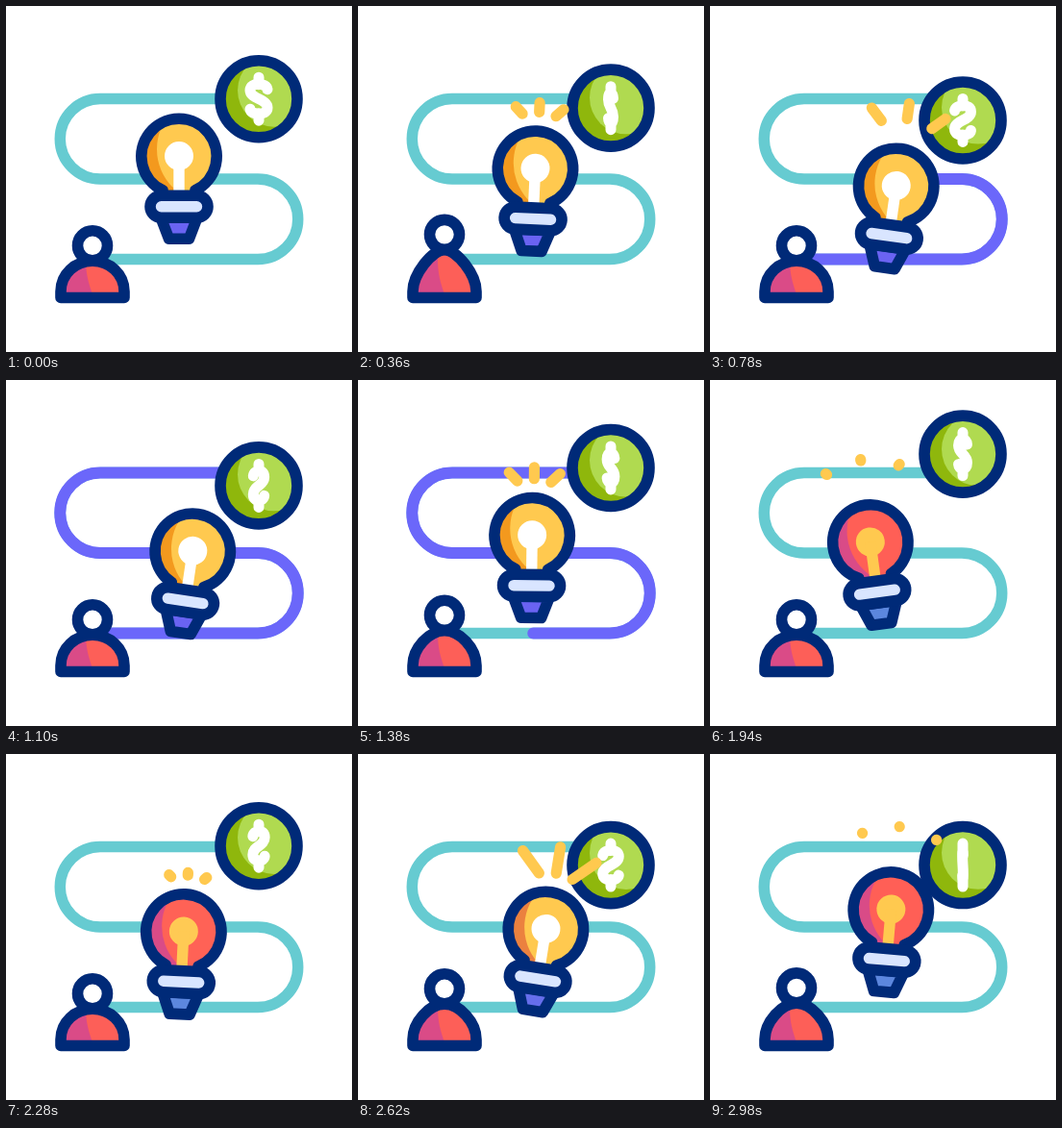
An HTML page that plays this animation: 360 px wide and 360 px high, repeating every 3 s.

```html
<!DOCTYPE html>
<html lang="en">
<head>
<meta charset="utf-8">
<title>From idea to income</title>
<style>
  html, body { margin: 0; width: 100%; height: 100%; overflow: hidden; background: #fff; }
  svg { display: block; width: 100vw; height: 100vh; }
  .line { fill: none; stroke-linecap: round; stroke-linejoin: round; }
  .navy { stroke: #002a78; stroke-width: 11.6; stroke-linejoin: round; }
</style>
</head>
<body>
<svg viewBox="0 0 360 360">
  <defs>
    <path id="glass" d="M163 200V191.8A39.2 39.2 0 1 1 197 191.8V200Z"/>
    <clipPath id="coinClip"><circle r="38"/></clipPath>
    <clipPath id="bulbClip"><use href="#glass"/></clipPath>
    <clipPath id="bodyClip"><path id="bodyClipShape"/></clipPath>
  </defs>

  <path id="road" class="line" stroke="#66cbd1" stroke-width="11.4"
    d="M90 263.5H262A41.75 41.75 0 0 0 262 180H98A41.75 41.75 0 0 1 98 96.5H262"/>
  <path id="progress" class="line" stroke="#6b67fa" stroke-width="12" pathLength="1"/>

  <g id="coin">
    <g clip-path="url(#coinClip)">
      <circle r="38" fill="#8fb70c"/>
      <circle id="coinLight" cx="16" r="38" fill="#b0da50"/>
    </g>
    <circle class="navy" r="40" fill="none"/>
    <path id="dollar" class="line" stroke="#fff" stroke-width="11"/>
  </g>

  <g id="person">
    <g clip-path="url(#bodyClip)">
      <path d="M50 240H130V309H50Z" fill="#da4b87"/>
      <path d="M83 240V264C83 280 86 289 93 309H130V240Z" fill="#fd5f58"/>
    </g>
    <path id="body" class="navy" fill="none"/>
    <circle id="head" class="navy" cx="90" r="15.5" fill="#fff"/>
  </g>

  <g id="bulb">
    <path id="screw" class="navy" d="M161 220H199L190.5 242.2H169.5Z"/>
    <g clip-path="url(#bulbClip)">
      <path id="bulbShade" d="M140 117H220V200H140Z"/>
      <circle id="bulbLight" cx="213" cy="149" r="56"/>
    </g>
    <use href="#glass" class="navy" fill="none"/>
    <g id="filament">
      <circle cx="180" cy="156" r="15"/>
      <path d="M174.3 156H185.7V194H174.3Z"/>
    </g>
    <rect class="navy" x="150" y="197.2" width="60" height="23" rx="11.5" fill="#d9e5ff"/>
    <g id="rays" class="line" stroke="#ffc94f" stroke-width="11.2"></g>
  </g>
</svg>

<script>
  const LOOP = 3000;
  const $ = id => document.getElementById(id);
  const set = (el, attrs) => Object.entries(attrs).forEach(([k, v]) => el.setAttribute(k, v));
  const mix = (a, b, p) => a + (b - a) * p;
  const ease = p => (1 - Math.cos(Math.PI * Math.min(1, Math.max(0, p)))) / 2;
  const ramp = (t, from, to) => ease((t - from) / (to - from));

  // Eased value between [time, value] keys
  function keyed(t, keys) {
    const i = Math.max(1, keys.findIndex(k => k[0] > t));
    const [t0, v0] = keys[i - 1], [t1, v1] = keys[i];
    return mix(v0, v1, ramp(t, t0, t1));
  }

  const blend = (a, b, p) => `rgb(${a.map((v, i) => Math.round(mix(v, b[i], p)))})`;
  const YELLOW = [255, 201, 79], ORANGE = [243, 153, 30], RED = [255, 95, 86],
        PINK = [217, 75, 135], WHITE = [255, 255, 255],
        PURPLE = [106, 99, 242], BLUE = [92, 135, 222];

  const COIN_Y = [[0, 96.7], [800, 119], [1800, 75], [2800, 119], [3800, 75]];
  const COIN_FLIP = [[0, 1], [880, -1], [1660, 1], [2500, -1], [3440, 1]];
  const BULB_TILT = [[0, 0], [1000, 9.1], [1800, -9.1], [2600, 9.1], [3400, 0]];
  const GLOW = [[0, 0], [1600, 0], [1940, 1], [2240, 1], [2630, 0], [2960, 1], [3300, 1]];
  const SHADE_GLOW = [[0, 0], [1600, 0], [1940, 1], [2300, 1], [2650, 0.3], [2960, 1], [3300, 1]];

  // Inner and outer end of each ray
  const RAYS = [[164, 100, 143.5, 79.5], [181.5, 97.5, 181.5, 69.5], [199, 101, 221, 80]];
  const rayLines = RAYS.map(() => $('rays').appendChild(
    document.createElementNS('http://www.w3.org/2000/svg', 'line')));

  $('progress').setAttribute('d', $('road').getAttribute('d'));

  function drawProgress(t) {
    const end = ramp(t, 400, 1200), start = ramp(t, 1200, 2000);
    set($('progress'), {
      'stroke-dasharray': `${end - start} 2`,
      'stroke-dashoffset': -start,
      visibility: end > start ? 'visible' : 'hidden'
    });
  }

  function drawCoin(t) {
    const y = keyed(t, COIN_Y), k = 9 * keyed(t, COIN_FLIP);
    set($('coin'), { transform: `translate(263 ${y})` });
    set($('coinLight'), { cy: -9 - (y - 97) * 0.2 });
    set($('dollar'), {
      d: `M0-22.5V-15M0 15V22.5M${k}-10C${k * 0.9}-17 ${-k}-18 ${-k}-9` +
         `C${-k} 0 ${k} 0 ${k} 9C${k} 18 ${-k * 0.9} 17 ${-k} 10.5`
    });
  }

  function drawPerson(t) {
    const phase = t % 1230;
    const lift = 11.5 * ease(1 - Math.abs(phase - 350) / 350);
    const top = 265.2 - lift, w = 18 - lift * 0.45;
    const d = `M57 303.5V297C57 279 ${90 - w} ${top} 90 ${top}S123 279 123 297V303.5Z`;
    set($('body'), { d });
    set($('bodyClipShape'), { d });
    set($('head'), { cy: 249.3 - lift });
  }

  function drawBulb(t) {
    const drop = 30 * (1 - Math.cos(Math.PI * t / 800)) / 2;
    const glow = keyed(t, GLOW), shadeGlow = keyed(t, SHADE_GLOW);
    set($('bulb'), { transform: `translate(0 ${drop}) rotate(${keyed(t, BULB_TILT)} 180 254)` });
    set($('bulbLight'), { fill: blend(YELLOW, RED, glow) });
    set($('bulbShade'), { fill: blend(ORANGE, PINK, shadeGlow) });
    set($('screw'), { fill: blend(PURPLE, BLUE, shadeGlow) });
    set($('filament'), { fill: blend(WHITE, YELLOW, glow) });
  }

  function drawRays(t) {
    const phase = (t + 800) % 1000;
    const end = ramp(phase, 0, 400), start = ramp(phase, 400, 800);
    set($('rays'), { visibility: end > start ? 'visible' : 'hidden' });
    RAYS.forEach(([x1, y1, x2, y2], i) => set(rayLines[i], {
      x1: mix(x1, x2, start), y1: mix(y1, y2, start),
      x2: mix(x1, x2, end), y2: mix(y1, y2, end)
    }));
  }

  function draw(t) {
    drawProgress(t);
    drawCoin(t);
    drawPerson(t);
    drawBulb(t);
    drawRays(t);
  }

  const begin = performance.now();
  function tick() {
    draw((performance.now() - begin) % LOOP);
    requestAnimationFrame(tick);
  }
  tick();
</script>
</body>
</html>
```
